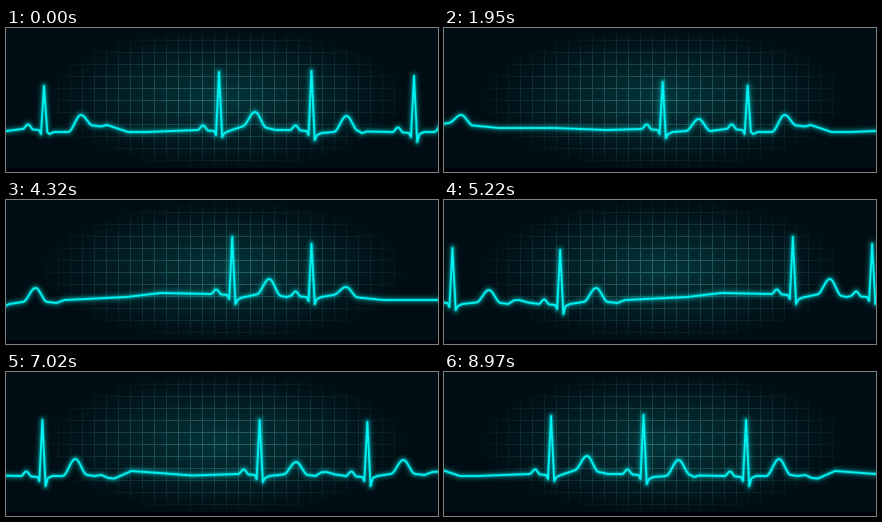
Recreate the animation shown at these times as a matplotlib script. Size 432 by 144 pixels, loop 9000 ms.

```python
import numpy as np
import matplotlib.pyplot as plt
from matplotlib.animation import FuncAnimation

W, H = 432, 144
FRAMES, INTERVAL = 300, 30
SPEED = 4.087        # px per frame
PERIOD = 1328        # length of the repeating trace

# R x, resting level, R top, S bottom, level after S, rise before T,
# T offset, T top, level after T
BEATS = [
    (38, 101, 58, 104, 104, 0, 37, 87, 97.5),
    (213, 102, 44, 109, 103, 4.5, 36, 84, 100),
    (305.5, 102, 43, 112, 105, 1, 35, 88, 103),
    (408, 104, 48, 114, 104, 0, 33, 87, 103),
    (625.3, 102, 48, 110, 104, 1.5, 36.5, 90, 103),
    (733, 104, 50, 114, 104, 2, 36, 88, 102),
    (965.7, 94, 37, 104, 97.5, 3, 37, 79, 96),
    (1045, 96, 44, 104, 97, 2, 34.5, 87, 97.5),
    (1281, 101, 54, 110, 104, 1, 36, 91, 103),
]

# Slow wander of the line between beats
DRIFT = [
    (95, 98.5), (101, 97), (122, 104), (140, 104), (270, 102),
    (356, 105), (361, 103.5), (460, 104), (467, 103), (474, 106),
    (480, 106.5), (497, 99), (525, 101), (558, 103.5), (681, 104),
    (687, 100.3), (692, 100), (701, 102.5), (790, 103), (798, 100),
    (860, 97), (894, 93), (1020, 97), (1117, 100), (1173, 100), (1225, 102),
]


def ease(a, b, n=10):
    """Cosine-eased points from a to b."""
    k = np.linspace(0, 1, n)
    x = a[0] + (b[0] - a[0]) * k
    y = a[1] + (b[1] - a[1]) * (1 - np.cos(np.pi * k)) / 2
    return list(zip(x, y))


def beat(x, base, top, s, rest, rise, t, t_top, end):
    p, peak = (-16, base - 4.5), (t, t_top)
    pts = ease((-21.5, base), p) + ease(p, (-10.5, base + 0.5))
    pts += [(-5, base + 1), (-3, base + 5), (0, top), (3.2, s),
            (5.5, rest + 2), (10, rest)]
    pts += ease((t - 13, rest - rise), peak) + ease(peak, (t + 12, end))
    return [(x + dx, y) for dx, y in pts]


def backdrop():
    x, y = np.meshgrid(np.arange(W), np.arange(H))
    r = np.hypot((x - 218) / 185, (y - 70) / 72)
    fade = np.clip(1 - r, 0, 1)[..., None]
    dark, light = np.array([1, 13, 20]), np.array([4, 54, 59])
    img = dark + (light - dark) * fade ** 1.1
    grid = ((x - 4) % 12 == 0) | (y % 12 == 0)
    ink = np.array([62, 134, 132])
    alpha = 0.62 * fade ** 0.8 * grid[..., None]
    img = img * (1 - alpha) + ink * alpha
    img[140:] = (0, 2, 10)
    return img.astype(np.uint8)


knots = DRIFT + [pt for b in BEATS for pt in beat(*b)]
tile = np.array(sorted(knots, key=lambda pt: pt[0]))
trace = np.vstack([tile, tile + (PERIOD, 0)])

fig = plt.figure(figsize=(W / 72, H / 72), dpi=72)
ax = fig.add_axes([0, 0, 1, 1])
ax.imshow(backdrop(), extent=(0, W, H, 0), interpolation="nearest", aspect="auto")
ax.set(xlim=(0, W), ylim=(H, 0))
ax.axis("off")

# Soft halo under a crisp core
widths = [13, 10, 7.5, 5.5, 3.6, 1.9]
alphas = [0.035, 0.05, 0.08, 0.13, 0.24, 1]
lines = [ax.plot([], [], color="#00f2f2", lw=lw, alpha=a,
                 solid_joinstyle="round", solid_capstyle="round")[0]
         for lw, a in zip(widths, alphas)]


def draw(i):
    x = trace[:, 0] - PERIOD + SPEED * i
    for line in lines:
        line.set_data(x, trace[:, 1])
    return lines


anim = FuncAnimation(fig, draw, frames=FRAMES, interval=INTERVAL,
                     repeat=True, repeat_delay=0, blit=False)
plt.show()
```
